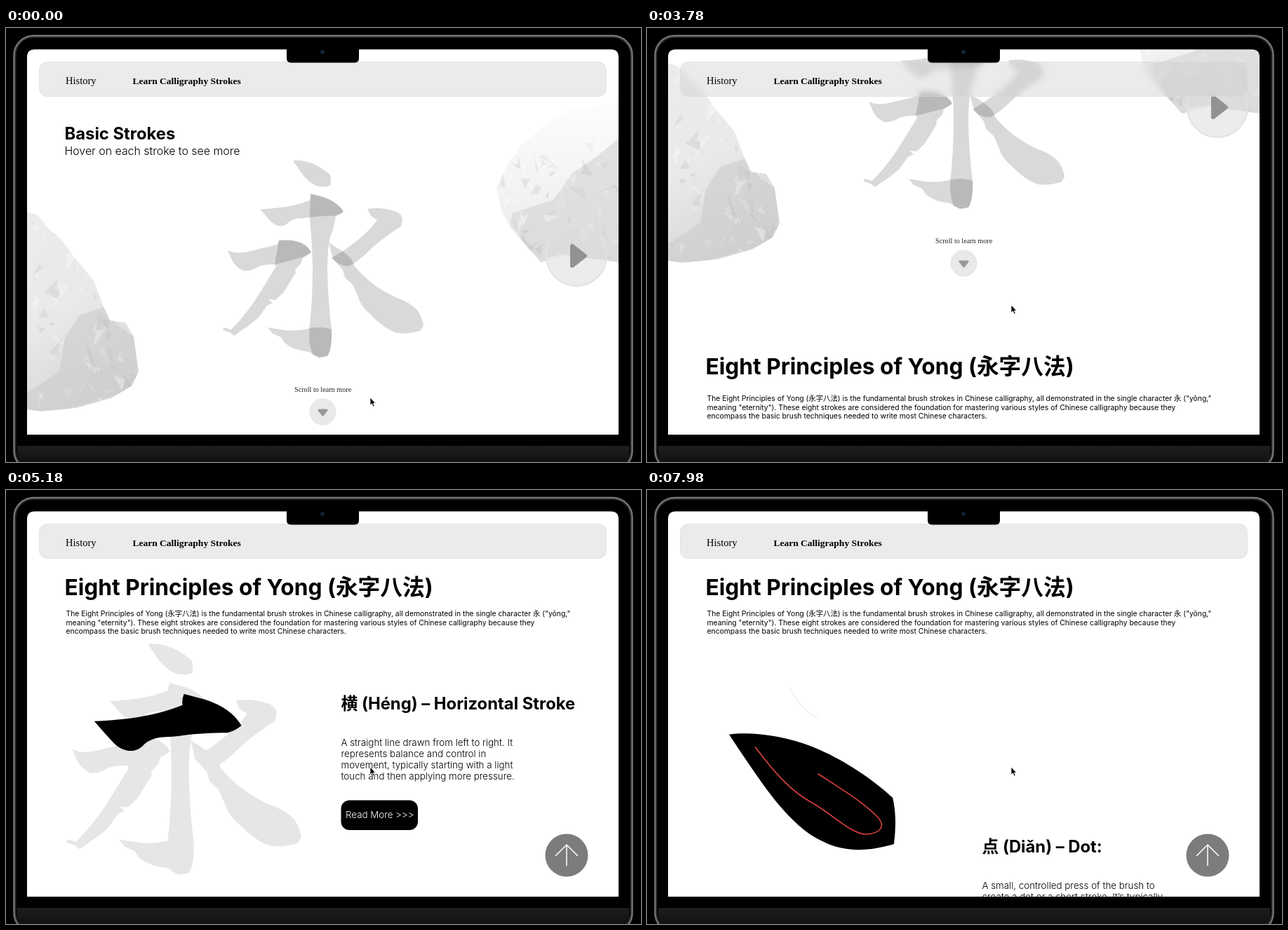
Write an HTML page that moves like this. It is 905 px wide and 619 px high and loops after 8000 ms.

```html
<!DOCTYPE html>
<html lang="en">
<head>
<meta charset="utf-8">
<title>Calligraphy strokes</title>
<style>
html, body { margin: 0; width: 100%; height: 100%; overflow: hidden; background: #000; }
#stage { position: relative; width: 905px; height: 619px; overflow: hidden; }
svg { position: absolute; left: 0; top: 0; display: block; }
#nav {
  position: absolute; left: 47px; top: 48px; width: 807px; height: 48px;
  border: 1px solid rgba(222, 222, 222, .5); border-radius: 12px;
  background: rgba(205, 205, 205, .4); backdrop-filter: blur(4px);
}
text { white-space: pre; }
.b { font: 700 23.8px Inter, "Noto Sans CJK SC", "Noto Sans CJK", sans-serif; }
.h { font-size: 31.7px; }
.l { font: 300 13.35px Inter, "Noto Sans CJK SC", "Noto Sans CJK", sans-serif; }
.p { font-size: 10.36px; font-weight: 400; }
.s { font: 14.5px "Liberation Serif", serif; }
.tag { font: 900 24px Lato, "Noto Sans CJK SC", "Noto Sans CJK", sans-serif; }
</style>
</head>
<body>
<div id="stage">
<svg width="905" height="619" viewBox="0 0 905 619">
  <defs>
    <clipPath id="clipL"><path id="rockL" d="M30 262L44 266 60 285 80 303 100 330 125 360 138 395 148 417 170 420 182 440 189 490 180 510 150 528 100 542 50 547 30 544Z"/></clipPath>
    <clipPath id="clipR"><path id="rockR" d="M873 94L840 111 805 115 770 138 735 165 712 200 699 228 706 260 719 285 745 315 762 334 800 325 845 330 873 334Z"/></clipPath>
    <linearGradient id="shadeL" x1="0" y1="0" x2=".35" y2="1">
      <stop offset="0" stop-color="#ececec"/><stop offset=".55" stop-color="#e9e9e9"/><stop offset="1" stop-color="#d6d6d6"/>
    </linearGradient>
    <linearGradient id="shadeR" x1="0" y1="0" x2="0" y2="1">
      <stop offset="0" stop-color="#fefefe"/><stop offset=".5" stop-color="#f4f4f4"/><stop offset="1" stop-color="#e8e8e8"/>
    </linearGradient>
  </defs>
  <rect x="30" y="30" width="843" height="550" fill="#fff"/>

  <g id="hero">
    <g clip-path="url(#clipL)">
      <use href="#rockL" fill="url(#shadeL)"/>
      <path d="M84 442L104 410 140 398 160 425 182 440 189 490 170 520 80 545 30 546V520L76 490Z" fill="#cdcdcd" opacity=".6"/>
      <g id="facetL"></g>
    </g>
    <g clip-path="url(#clipR)">
      <use href="#rockR" fill="url(#shadeR)"/>
      <path d="M873 158L838 186 806 208 780 245 722 264 718 280 762 334 873 334Z" fill="#d4d4d4" opacity=".6"/>
      <g id="facetR"></g>
    </g>
    <text class="b" x="83.5" y="159">Basic Strokes</text>
    <text class="l" x="83.5" y="181" style="font-size:15.9px">Hover on each stroke to see more</text>
    <g id="heroGlyph"></g>
    <g id="tags"></g>
    <circle cx="813" cy="325" r="43" fill="#dcdcdc" fill-opacity=".6" stroke="#e2e2e2" stroke-width="2"/>
    <path d="M771 328Q800 318 822 326T855 331A43 43 0 0 1 771 333Z" fill="#eee" opacity=".6"/>
    <path d="M807 311V339L825 325Z" fill="#929292" stroke="#929292" stroke-width="6" stroke-linejoin="round"/>
    <text class="s" x="411" y="518.5" style="font-size:10.2px" fill="#222">Scroll to learn more</text>
    <circle cx="451.5" cy="547.5" r="18.5" fill="#e6e6e6" fill-opacity=".85" stroke="#e4e4e4"/>
    <path d="M446 545H457L451.5 552Z" fill="#999" stroke="#999" stroke-width="3" stroke-linejoin="round"/>
  </g>

  <g id="sec1">
    <g id="gray1"></g>
    <use id="big1" href="#heng"/>
    <path id="red1" d="M166 391C140 387 123 387 123 400C124 418 140 427 160 427C230 425 250 355 345 353C376 353 398 378 398 387C397 398 365 389 344 370"/>
  </g>
  <g id="text1">
    <text class="b" x="477.5" y="8">横 (Héng) – Horizontal Stroke</text>
    <g id="body1"></g>
    <rect x="477.5" y="137.5" width="109.5" height="42.5" rx="12"/>
    <text class="l" x="484" y="163" fill="#fff">Read More &gt;&gt;&gt;</text>
  </g>

  <rect id="cover" x="30" width="843" height="1500" fill="#fff"/>
  <path id="edge1" d="M203 219Q221 253 243 262" fill="none" stroke="#e2e2e2"/>
  <g id="sec2">
    <g id="gray2"></g>
    <path id="edge2" d="M203 219Q221 253 243 262" fill="none" stroke="#e2e2e2"/>
    <use id="big2" href="#dian"/>
    <path id="red2" d="M154.5 304C180 338 204 365 230 380C262 397 290 428 313 428C332 427 340 417 330 405C310 383 270 359 244 342"/>
  </g>
  <g id="text2">
    <text class="b" x="477.5" y="8">点 (Diǎn) – Dot:</text>
    <g id="body2"></g>
  </g>

  <g id="head">
    <rect x="30" y="-100" width="843" height="169.5" fill="#fff"/>
    <text class="b h" x="83.5" y="12">Eight Principles of Yong (永字八法)</text>
  </g>
  <g id="intro"></g>
  <g id="up">
    <circle cx="799" r="30.5" fill="#7c7c7c"/>
    <path d="M799 15V-15M783 1L799 -15 815 1" fill="none" stroke="#fff" stroke-width="1.5"/>
  </g>
</svg>
<div id="nav"></div>
<svg width="905" height="619" viewBox="0 0 905 619">
  <defs>
    <linearGradient id="base" x1="0" y1="0" x2="0" y2="1">
      <stop offset="0" stop-color="#1e1e1e"/><stop offset="1" stop-color="#111"/>
    </linearGradient>
  </defs>
  <path fill-rule="evenodd" d="M0 0H905V619H0ZM30 580V41.5Q30 30.5 41 30.5H862Q873 30.5 873 41.5V580Z"/>
  <path d="M16 596H888V619H20Q16 610 16 604Z" fill="url(#base)"/>
  <rect x="13.5" y="13" width="877" height="616" rx="26" fill="none" stroke="#262626" stroke-width="2"/>
  <rect x="11.5" y="11" width="881" height="620" rx="28" fill="none" stroke="#737373" stroke-width="2.5"/>
  <path d="M400 30H503V43Q503 49.5 497 49.5H406Q400 49.5 400 43Z"/>
  <circle cx="451" cy="34" r="3.5" fill="#0c1420"/><circle cx="451" cy="34" r="1.5" fill="#1d3350"/>
  <text class="s" x="85" y="80">History</text>
  <text class="s" x="180.5" y="80" style="font-size:13.5px;font-weight:700">Learn Calligraphy Strokes</text>
  <path id="arrow" d="M0 0V11L2.5 8.8 4.3 13 6.2 12.2 4.4 8.2H7.6Z" stroke="#fff" stroke-width=".8"/>
  <path id="hand" d="M0 1Q1 -1 2.2 .8L4 4.5 5.5 4 7 4.3 8.5 4.5 10 6V9L9 12H4L0 8.5Q-1 6.5 1.5 7.2L2.2 7.5Z" fill="#fff" stroke="#000" stroke-width="1"/>
</svg>
</div>
<script>
const NS = 'http://www.w3.org/2000/svg';
const $ = id => document.getElementById(id);
const set = (el, o) => { for (const k in o) el.setAttribute(k, o[k]); return el; };
const add = (to, tag, o = {}) => to.appendChild(set(document.createElementNS(NS, tag), o));
const lerp = (a, b, p) => a + (b - a) * p;
const ramp = (t, a, b) => Math.min(1, Math.max(0, (t - a) / (b - a)));
const smooth = p => p * p * (3 - 2 * p);
const moveY = (id, y) => set($(id), { transform: `translate(0 ${y})` });

const strokes = {
  dian: 'M409 189C416.5 188 427 189.5 436 193C446 197 455.5 203.5 462 209.5Q463.5 216 462.4 224.5C450.5 228 443 226.5 434.7 221C425.5 214 420 205.5 409 189Z',
  heng: 'M362 258.5C384.7 257.5 409.6 255 433.4 245.4Q432.7 241 434.5 236.5L452 241Q473 248 481 262Q476.4 266 470 267.8C456 267.8 441.6 268.8 432 270.2C422 271.7 416.7 270.6 411.4 272.4Q404.3 274.5 401 278.8Q396 283.4 389 282.3Q383 281.6 377.6 276Q370 267.8 362 258.5Z',
  shu: 'M434.5 236.5L452 241Q473 248 481 262Q476 266 470 268Q468 284 462 298Q458 315 458 345Q459 390 464 430Q465 458 458 468L446 470 438 466Q432 458 432 432Q437 390 437 340Q436 300 432.5 268Z',
  gou: 'M373 427L391 430Q413 434 434 428Q452 425 464 430Q465 456 458 468L446 470 438 466 432 462Q410 460 397 449L392 441 380 436Z',
  ti: 'M316 317Q328 323 345 319L386 309 389 303Q425 300 435 320Q426 327 415 329L384 337Q365 337 358 341Q350 347 338 346Q327 341 322 331Z',
  wan: 'M389 303Q425 300 435 320L423 328 421 335 412 345 413 349 395 378 384 388 374 387 380 392 372 396 359 414 345 425 325 439 319 434 309 431 310 427 321 430Q348 402 364 374L385 340 383 337Z',
  pie: 'M515 258Q535 255 553 261Q562 263 565 271L563 283Q540 297 520 315Q505 331 490 339Q476 341 464 328Q500 307 522 283L529 274 520 268Z',
  na: 'M460 306L479 318Q494 328 497 340Q520 368 555 384Q580 393 588 405Q594 415 595 425L590 432Q570 437 558 435Q540 430 520 409Q506 398 502 384L494 366 483 356 480 345 466 329Z'
};
const defs = document.querySelector('defs');
for (const k in strokes) {
  add(defs, 'path', { id: k, d: strokes[k] });
  add($('heroGlyph'), 'use', { href: '#' + k, id: 'hero-' + k });
}
const affine = m => `matrix(${m[0]} 0 0 ${m[0]} ${m[1]} ${m[2]})`;
// scale s that carries (x, y) to (X, Y)
const fit = (s, x, y, X, Y) => [s, X - x * s, Y - y * s];
const small = fit(1.171, 309, 188.5, 86, 219);
const zoomed = { 1: fit(2.815, 362, 236.5, 86, 319), 2: fit(4.4, 409, 188.5, 117, 283.5) };
for (const n of [1, 2]) {
  const g = add($('gray' + n), 'g', { transform: affine(small) });
  for (const k in strokes) add(g, 'use', { href: '#' + k });
  set($('red' + n), { fill: 'none', stroke: '#dd413b', 'stroke-width': 1.6, 'stroke-linecap': 'round', pathLength: 1, 'stroke-dasharray': 1 });
}

function lines(id, y, step, x, cls, rows) {
  rows.forEach((row, i) => add($(id), 'text', { x, y: y + i * step, class: cls }).textContent = row);
}
lines('intro', 42, 12.5, 85.5, 'l p', [
  'The Eight Principles of Yong (永字八法) is the fundamental brush strokes in Chinese calligraphy, all demonstrated in the single character 永 ("yǒng,"',
  'meaning "eternity"). These eight strokes are considered the foundation for mastering various styles of Chinese calligraphy because they',
  'encompass the basic brush techniques needed to write most Chinese characters.']);
lines('body1', 60, 16, 477.5, 'l', ['A straight line drawn from left to right. It', 'represents balance and control in',
  'movement, typically starting with a light', 'touch and then applying more pressure.']);
lines('body2', 60, 16, 477.5, 'l', ['A small, controlled press of the brush to', 'create a dot or a short stroke. It’s typically']);

let seed = 7;
const rnd = () => (seed = seed * 16807 % 2147483647) / 2147483647;
function facets(id, x, y, w, h) {
  for (let i = 0; i < 90; i++) {
    const cx = x + rnd() * w, cy = y + rnd() * h, r = 6 + rnd() * 18;
    const pt = k => `${cx + (rnd() - .5) * r * k} ${cy + (rnd() - .3) * r * 2}`;
    add($(id), 'path', { d: `M${pt(1)}L${pt(2)} ${pt(1)} ${pt(2)}Z`, fill: rnd() < .6 ? '#fff' : '#b5b5b5', opacity: .12 + rnd() * .2 });
  }
}
facets('facetL', 30, 262, 160, 285);
facets('facetR', 699, 150, 175, 185);

// stroke, hover from, to, label text, x, y, label from, to
const hovers = [
  ['na', 2170, 2310, '（nà） 捺', 559, 440, 2240, 2450],
  ['gou', 2310, 2520, '（gōu） 钩', 321, 499, 2380, 2800],
  ['wan', 2520, 2800, '（wān） 弯', 80, 394, 2590, 2900],
  ['ti', 2800, 3010, '（tí） 提', 80, 300, 2870, 3000],
  ['heng', 3010, 3080, '（héng） 横', 145, 238, 3010, 3150],
  ['dian', 3080, 3150, '（diǎn） 点', 480, 152, 3080, 3220],
  ['pie', 3150, 3220, '（piě） 撇', 604, 240, 3150, 3280],
  ['na', 3220, 3290]
];
for (const h of hovers) {
  if (!h[3]) continue;
  h.tag = add($('tags'), 'g', { transform: `translate(${h[4]} ${h[5]})` });
  add(h.tag, 'rect', { x: .5, y: .5, width: 195, height: 44, rx: 12, fill: '#ededed', 'fill-opacity': .88, stroke: '#e6e6e6', 'stroke-width': 1.5 });
  add(h.tag, 'text', { x: 12, y: 31, class: 'tag' }).textContent = h[3];
}

const scroll = [[3570, 0], [3640, 62], [3780, 212], [3850, 270], [3920, 312], [4060, 345], [4130, 345], [4200, 400],
  [4340, 600], [4480, 780], [4620, 870], [4970, 915], [5950, 1209], [6230, 1262], [6340, 1330], [7350, 1720], [7980, 1920]];
const pointer = [[0, 519, 527], [70, 519, 528], [210, 519, 528], [280, 528, 575], [350, 535, 601], [420, 480, 560], [490, 472, 515],
  [560, 508, 500], [770, 508, 500], [910, 520, 470], [980, 512, 453], [1050, 532, 473], [1190, 532, 473], [1400, 540, 488],
  [2100, 540, 488], [2240, 540, 400], [2380, 455, 445], [2590, 392, 388], [2730, 392, 388], [2940, 345, 330],
  [3010, 400, 262], [3080, 440, 207], [3150, 535, 280], [3220, 530, 390], [3290, 519, 395]];
function along(keys, t) {
  const i = keys.findIndex(k => k[0] > t);
  if (i < 0) return keys[keys.length - 1].slice(1);
  const a = keys[i - 1] || keys[0], b = keys[i], p = ramp(t, a[0], b[0]);
  return a.slice(1).map((v, j) => lerp(v, b[j + 1], p));
}

function section(n, z) {
  set($('gray' + n), { opacity: .15 * (1 - z) });
  set($('big' + n), { transform: affine(small.map((v, i) => lerp(v, zoomed[n][i], z))) });
  set($('red' + n), { opacity: Math.max(0, 1 - 5 * (1 - z)), 'stroke-dashoffset': 1 - z });
}

function draw(t) {
  const s = along(scroll, t)[0], [x, y] = along(pointer, t);
  moveY('hero', -s);
  moveY('sec1', Math.max(0, 837 - s));
  moveY('edge1', Math.max(0, 837 - s));
  moveY('text1', 1283 - s);
  moveY('cover', 1910 - s);
  moveY('sec2', Math.max(0, 1983 - s));
  moveY('text2', 2429 - s);
  moveY('head', Math.max(138, 694 - s));
  moveY('intro', Math.max(138, 702 - s));
  moveY('up', Math.max(521, 1077 - s));

  const grow1 = smooth(ramp(t, 4340, 4600)), back1 = 1 - (1 - ramp(t, 4700, 5900)) ** 2;
  const z2 = smooth(ramp(t, 7400, 7900));
  section(1, grow1 * (1 - back1));
  section(2, z2);
  set($('edge1'), { opacity: s > 1780 ? 0 : 1 });
  set($('edge2'), { opacity: z2 });

  let over = null;
  for (const h of hovers) {
    if (t >= h[1] && t < h[2]) over = h[0];
    if (h.tag) set(h.tag, { opacity: ramp(t, h[6] - 70, h[6]) * (1 - ramp(t, h[7] - 100, h[7])) });
  }
  for (const k in strokes) set($('hero-' + k), { 'fill-opacity': k === over ? 1 : .15 });
  const at = `translate(${x} ${y})`;
  set($('arrow'), { transform: at, opacity: over ? 0 : 1 });
  set($('hand'), { transform: at, opacity: over ? 1 : 0 });
}

function frame() {
  draw(Math.floor(performance.now() % 8000 / 70) * 70);
  requestAnimationFrame(frame);
}
frame();
</script>
</body>
</html>
```
